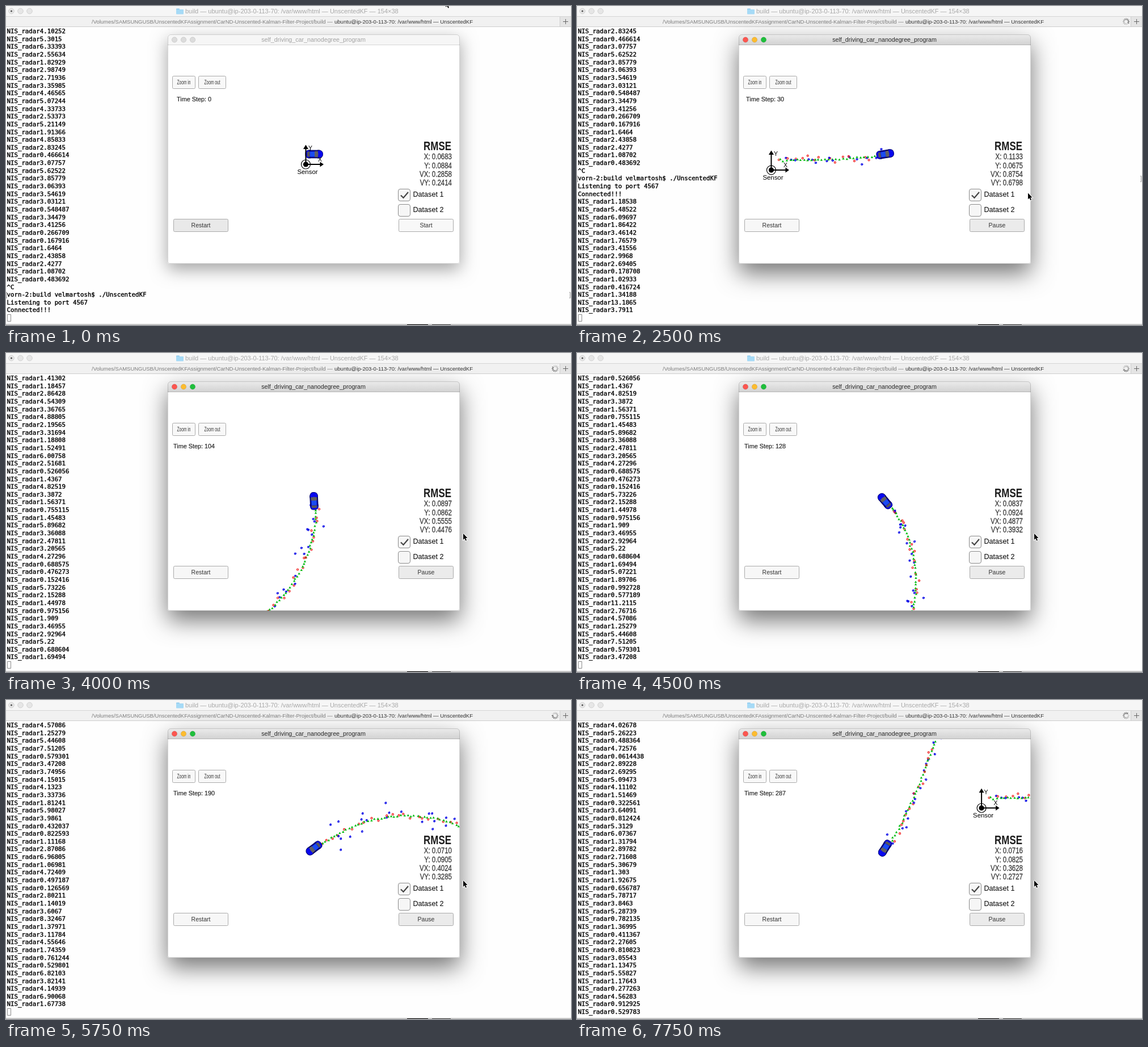
Write an HTML page with a canvas that moves like this. It is 996 px wide and 562 px high and loops after 8000 ms.

```html
<!DOCTYPE html>
<html lang="en">
<head>
<meta charset="utf-8">
<title>Kalman filter simulator</title>
<style>
html, body { margin: 0; width: 100%; height: 100%; overflow: hidden; background: #fff; }
canvas { display: block; width: 996px; height: 562px; }
</style>
</head>
<body>
<canvas id="stage" width="996" height="562"></canvas>
<script>
const ctx = document.getElementById('stage').getContext('2d');
const SANS = '"Liberation Sans", Arial, sans-serif';
const MONO = '"DejaVu Sans Mono", "Liberation Mono", monospace';
const LOOP = 8000, TICK = 250;
const LAUNCH = 1878, STEPS_PER_MS = .04895;

const rand = n => { const v = Math.sin(n * 12.9898) * 43758.5453; return v - Math.floor(v); };
const gauss = n => 2 * (rand(n) + rand(n + .31) + rand(n + .67) - 1.5);

// ---- terminal text: each log line is a chi-squared value with three degrees of freedom ----
const HOST = 'ubuntu@ip-203-0-113-70: /var/www/html — UnscentedKF';
const PROMPT = 'vorn-2:build velmartosh$ ./UnscentedKF';
function nisLine(seed) {
  const v = [1, 2, 3].reduce((sum, j) => sum + gauss(seed + j * 1000) ** 2, 0);
  return 'NIS_radar' + Number(v.toPrecision(6));
}
const makeLog = (n, seed) => Array.from({ length: n }, (_, i) => nisLine(seed + i));
const before = [...makeLog(33, 5000), '^C', PROMPT, 'Listening to port 4567', 'Connected!!!'];
const run = makeLog(150, 9000);

// ---- key points: position on the timeline first, then values ----
const idleError = [.0683, .0884, .2858, .2414];
const liveError = [ // by step: RMSE of x, y, vx, vy
  [0, .125, .06, 1.05, .8],
  [67, .0989, .0767, .66, .5315],
  [128, .0837, .0924, .4877, .3932],
  [190, .071, .0905, .4024, .3285],
  [238, .0751, .0857, .3916, .2952],
  [287, .0716, .0825, .3628, .2727]
];
const pointer = [[0, 775, -9], [1000, 738, 391], [1250, 736, 392], [1750, 736, 392], [2750, 806, 318]];

function sample(keys, t, ease = u => u) {
  let i = 0;
  while (i < keys.length - 2 && t > keys[i + 1][0]) i++;
  const [a, b] = [keys[i], keys[i + 1]];
  const u = ease(Math.max(0, Math.min(1, (t - a[0]) / (b[0] - a[0]))));
  return a.slice(1).map((v, j) => v + (b[j + 1] - v) * u);
}
const smooth = u => u * u * (3 - 2 * u);

// ---- vehicle path in metres, sampled every half step ----
const SCALE = 24, W = 2 * Math.PI / 500;
const heading = k => .55 * 25 / (2 * Math.PI) * (1 - Math.cos(W * k));
const path = [[.6, .6]];
for (let i = 0; i < 600; i++) {
  const k = i / 2 + .25, d = (5 + .2 * Math.cos(2 * W * k)) * .025;
  const [x, y] = path[i];
  path.push([x + d * Math.cos(heading(k)), y + d * Math.sin(heading(k))]);
}

// ---- drawing helpers ----
function text(str, x, y, size, color, { font = SANS, align = 'left', weight = '', squash = 1, thicken = 0 } = {}) {
  ctx.save();
  ctx.translate(x, y);
  ctx.scale(squash, 1);
  ctx.font = `${weight} ${size}px ${font}`;
  ctx.textAlign = align;
  ctx.textBaseline = 'middle';
  ctx.fillStyle = ctx.strokeStyle = color;
  ctx.fillText(str, 0, 0);
  if (thicken) {
    ctx.lineWidth = thicken;
    ctx.strokeText(str, 0, 0);
  }
  ctx.restore();
}
function rect(x, y, w, h, color) {
  ctx.fillStyle = color;
  ctx.fillRect(x, y, w, h);
}
function box(x, y, w, h, r, fill, stroke) {
  ctx.beginPath();
  ctx.roundRect(x, y, w, h, r);
  if (fill) { ctx.fillStyle = fill; ctx.fill(); }
  if (stroke) { ctx.lineWidth = 1; ctx.strokeStyle = stroke; ctx.stroke(); }
}
function disc(x, y, r, fill, stroke, width = 1) {
  ctx.beginPath();
  ctx.arc(x, y, r, 0, 7);
  if (fill) { ctx.fillStyle = fill; ctx.fill(); }
  if (stroke) { ctx.lineWidth = width; ctx.strokeStyle = stroke; ctx.stroke(); }
}
function poly(points, fill) {
  ctx.beginPath();
  points.forEach(p => ctx.lineTo(...p));
  ctx.closePath();
  ctx.fillStyle = fill;
  ctx.fill();
}
function line(points, color, width) {
  ctx.beginPath();
  points.forEach(p => ctx.lineTo(...p));
  ctx.lineWidth = width;
  ctx.strokeStyle = color;
  ctx.stroke();
}

// ---- terminal window ----
function drawSpinner(t) {
  for (let i = 0; i < 12; i++) {
    const a = (i + t / TICK * 5) * Math.PI / 6, c = Math.cos(a), s = Math.sin(a);
    line([[968 + 3 * c, 27.5 + 3 * s], [968 + 6 * c, 27.5 + 6 * s]], `rgba(50,50,50,${.2 + i * .065})`, 1.2);
  }
}
function drawTerminal(t, count) {
  rect(0, 0, 996, 562, '#fefefe');
  rect(0, 0, 996, 18, '#f6f6f6');
  rect(0, 18, 996, 1, '#d4d4d4');
  rect(0, 19, 996, 17, '#f1f1f1');
  rect(977, 19, 19, 17, '#e4e4e4');
  rect(976, 19, 1, 17, '#cfcfcf');
  rect(0, 36, 996, 1, '#cdcdcd');
  [9.5, 25.5, 41.5].forEach(x => disc(x, 9, 4.8, '#e6e6e6', '#d2d2d2'));
  disc(9.5, 9, 1.6, '#555');
  box(300, 4.5, 6, 3, 1, '#8cc9ee');
  box(300, 6, 13, 8.5, 1, '#a6daf6');
  text('build — ' + HOST + ' — 154×38', 316, 9.5, 11, '#a8a8a8');
  text('/Volumes/SAMSUNGUSB/UnscentedKFAssignment/CarND-Unscented-Kalman-Filter-Project/build — ',
    151, 28, 9.47, '#7d7d7d');
  text(HOST, 579, 28, 9.55, '#333');
  line([[982, 27.5], [991, 27.5]], '#666', 1);
  line([[986.5, 23], [986.5, 32]], '#666', 1);
  if (t >= 2000) drawSpinner(t);

  const caret = t < 6750;
  const lines = [...before, ...run.slice(0, count)].slice(caret ? -37 : -38);
  lines.forEach((str, i) => {
    const y = 45.3 + i * 13.65;
    text(str, 1.5, y, 10.75, '#000', { font: MONO, thicken: .4 });
    if (str === PROMPT) {
      line([[2, y - 5], [.5, y - 5], [.5, y + 5], [2, y + 5]], '#999', 1);
      line([[993, y - 5], [994.5, y - 5], [994.5, y + 5], [993, y + 5]], '#999', 1);
    }
  });
  if (caret) box(2.5, 543.5, 6, 12, 0, null, '#8a8a8a');
  rect(0, 560, 996, 2, '#c9c9c9');
  rect(707, 561, 37, 1, '#000');
  rect(751, 561, 33, 1, '#444');
}

// ---- simulator window ----
function drawFrame(active) {
  ctx.save();
  ctx.shadowColor = `rgba(0,0,0,${active ? .54 : .36})`;
  ctx.shadowBlur = active ? 42 : 30;
  ctx.shadowOffsetY = active ? 17 : 10;
  box(285, 50, 515, 404, [5, 5, 3, 3], '#fff');
  ctx.restore();
  const bar = ctx.createLinearGradient(0, 50, 0, 68);
  bar.addColorStop(0, active ? '#ebebeb' : '#f6f6f6');
  bar.addColorStop(1, active ? '#d3d3d3' : '#f6f6f6');
  box(285, 50, 515, 18, [5, 5, 0, 0], bar);
  rect(285, 68, 515, 1, active ? '#b4b4b4' : '#d6d6d6');
  box(285.5, 50.5, 514, 403, [5, 5, 3, 3], null, 'rgba(0,0,0,.16)');
  const lamps = active ? ['#fc5650', '#fdbc2f', '#1fbf3c'] : ['#dcdcdc', '#dcdcdc', '#dcdcdc'];
  lamps.forEach((c, i) => disc(297 + 16 * i, 59.5, 4.7, c, 'rgba(0,0,0,.1)'));
  text('self_driving_car_nanodegree_program', 542, 60, 10.7, active ? '#2a2a2a' : '#a3a3a3', { align: 'center' });
}

function drawSensor(x, y) {
  line([[x, y], [x, y - 30]], '#000', 2);
  line([[x, y], [x + 26, y]], '#000', 2);
  poly([[x, y - 34.5], [x - 4.5, y - 27], [x + 4.5, y - 27]], '#000');
  poly([[x + 31.5, y], [x + 25, y - 4.5], [x + 25, y + 4.5]], '#000');
  disc(x, y, 8, null, '#000', 1.2);
  disc(x, y, 4.6, '#000');
  text('Y', x + 8, y - 27.5, 10.5, '#000', { align: 'center' });
  text('X', x + 25, y - 8, 10.5, '#000', { align: 'center' });
  text('Sensor', x + 3, y + 13.5, 11.4, '#000', { align: 'center' });
}

function drawCar(angle) {
  ctx.save();
  ctx.translate(543, 261);
  ctx.rotate(-angle);
  [-8, 8].forEach(x => rect(x - 2, -7.3, 4, 14.6, '#000'));
  box(-15, -6.8, 30.5, 13.6, [5, 6, 6, 5], '#0808ee', '#050878');
  box(-7, -4.5, 8, 9, 1, '#1a4cf0');
  poly([[-12, -4], [-7.5, -5], [-7.5, 5], [-12, 4]], '#56565a');
  poly([[1, -5], [6.5, -6], [7.5, 0], [6.5, 6], [1, 5]], '#606064');
  line([[-9, -5.5], [7, -6]], '#03043c', 1);
  line([[-9, 5.5], [7, 6]], '#03043c', 1);
  ctx.restore();
}

function drawTrail(step, toScreen) {
  for (let k = 0; k < step; k++) {
    const [px, py] = path[2 * k];
    if (k % 2) {
      const r = Math.hypot(px, py) + .25 * gauss(k + 700);
      const a = Math.atan2(py, px) + .03 * gauss(k + 1300);
      const [x, y] = toScreen(r * Math.cos(a), r * Math.sin(a));
      disc(x, y, 1.4, null, '#0000e6', 1.2);
      line([[x, y], [x + 2.4 * Math.cos(a), y - 2.4 * Math.sin(a)]], '#0000e6', 1.2);
    } else {
      const [x, y] = toScreen(px + .14 * gauss(k + 1900), py + .14 * gauss(k + 2500));
      disc(x, y, 1.5, null, '#f01010', 1.2);
    }
    const [gx, gy] = toScreen(px + .03 * gauss(k + 11), py + .03 * gauss(k + 423));
    poly([[gx, gy - 2.2], [gx + 2.2, gy + 1.6], [gx - 2.2, gy + 1.6]], '#00bc10');
  }
}

function drawScene(step) {
  const [cx, cy] = path[2 * step + 1];
  const toScreen = (x, y) => [546 + (x - cx) * SCALE, 261.6 - (y - cy) * SCALE];
  const [sx, sy] = toScreen(0, 0);
  ctx.save();
  ctx.beginPath();
  ctx.rect(285, 69, 515, 385);
  ctx.clip();
  drawTrail(step, toScreen);
  drawCar(heading(step));
  drawSensor(sx, sy + 3);
  ctx.restore();
}

function button(label, x, y, w, h, fill, squash = 1) {
  box(x + .5, y + .5, w, h, 2, fill, '#aaa');
  text(label, x + .5 + w / 2, y + 1 + h / 2, 10.5, '#333', { align: 'center', squash });
}
function checkbox(label, y, on) {
  box(691.5, y - 10.5, 21, 21, 3.5, '#f6f6f6', '#8b8b8b');
  if (on) line([[696, y + .5], [700.5, y + 5], [709, y - 5]], '#444', 2.2);
  text(label, 717.5, y, 12.6, '#000');
}

function drawControls(t, step) {
  const running = step > 0;
  const rmse = running ? sample(liveError, step) : idleError;
  button('Zoom in', 293, 123, 40, 22, '#f8f8f8', .63);
  button('Zoom out', 339, 123, 48, 22, '#f8f8f8', .63);
  text('Time Step: ' + step, 331.5, 165, 10.8, '#222', { align: 'center', thicken: .2 });
  text('RMSE', 785, 248, 22, '#1c1c1c', { align: 'right', weight: 'bold', squash: .77 });
  ['X', 'Y', 'VX', 'VY'].forEach((name, i) => {
    text(`${name}: ${rmse[i].toFixed(4)}`, 786, 266.3 + 15.3 * i, 14.4, '#3a3a3a',
      { align: 'right', squash: .8, thicken: .3 });
  });
  checkbox('Dataset 1', 333, true);
  checkbox('Dataset 2', 360, false);
  button('Restart', 295, 375, 96, 22, running ? '#f7f7f7' : '#e9e9e9');
  button(running ? 'Pause' : 'Start', 692, 375, 96, 22, t < 1000 ? '#f8f8f8' : '#ebebeb');
}

function drawPointer(x, y) {
  const shape = [[0, 0], [0, 11], [2.5, 8.8], [4.2, 12.8], [6, 12], [4.3, 8], [7.6, 8]];
  const at = shape.map(([a, b]) => [x + a, y + b]);
  line([...at, at[0]], '#fff', 2);
  poly(at, '#000');
}

function render(now) {
  const t = Math.floor(now % LOOP / TICK) * TICK;
  const step = Math.max(0, Math.round((t - LAUNCH) * STEPS_PER_MS));
  drawTerminal(t, Math.ceil(step / 2));
  drawFrame(t >= 1250);
  drawScene(step);
  drawControls(t, step);
  drawPointer(...sample(pointer, t, smooth));
}

const start = performance.now();
function loop() {
  render(performance.now() - start);
  requestAnimationFrame(loop);
}
loop();
</script>
</body>
</html>
```
